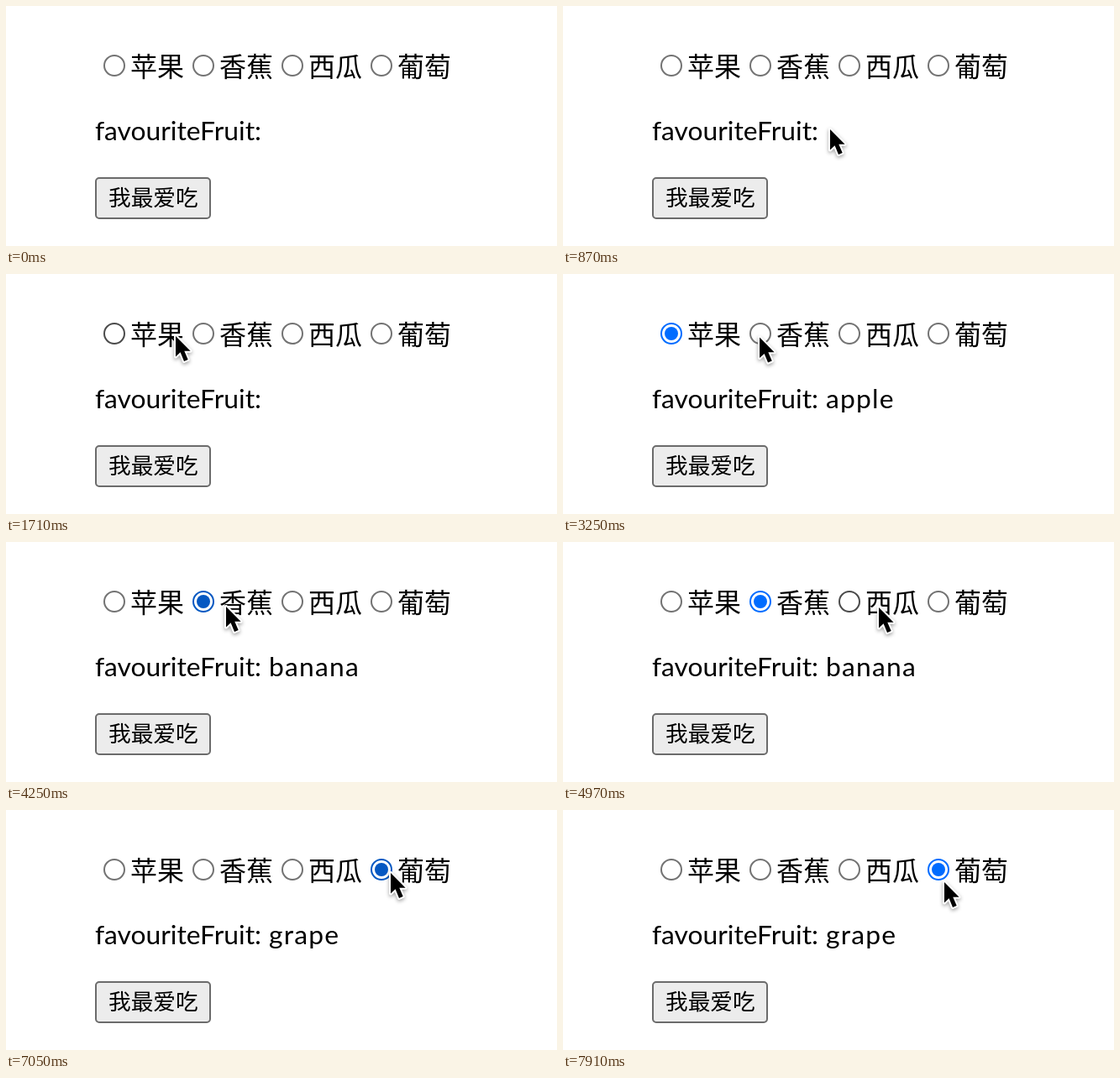
Write an HTML page that moves like this. It is 656 by 286 pixels and loops after 8 s.

```html
<!DOCTYPE html>
<html lang="zh">
<head>
<meta charset="utf-8">
<title>Radio group</title>
<style>
  html, body { margin: 0; width: 100%; height: 100%; overflow: hidden; background: #fff; }
  svg { display: block; width: 100vw; height: 100vh; }
  text { fill: #000; white-space: pre; }
  .cjk { font: 32px "Noto Sans CJK SC", "Noto Sans CJK", sans-serif; }
  .btn { font-size: 26.67px; }
  .latin { font: 31.8px Lato, "Open Sans", sans-serif; }
  #value { letter-spacing: 1.2px; }
  #cursor { filter: drop-shadow(0 2px 2px rgba(0, 0, 0, .35)); }
</style>
</head>
<body>
<svg viewBox="0 0 656 286" xmlns="http://www.w3.org/2000/svg">
  <rect width="656" height="286" fill="#fff"/>
  <g id="options"></g>
  <text class="latin" x="106" y="160">favouriteFruit:</text>
  <text class="latin" id="value" x="313" y="160"></text>
  <rect x="107" y="205" width="136" height="48" rx="4" fill="#ececec" stroke="#6b6b6b" stroke-width="2"/>
  <text class="cjk btn" x="122" y="238">我最爱吃</text>
  <path id="cursor" d="M0 0V24.5L5.6 19.3L10 30L14.7 28L10.3 17.7H17.6Z"
        stroke="#fff" stroke-width="4" stroke-linejoin="round" paint-order="stroke"/>
</svg>
<script>
const LOOP = 8000, PITCH = 106, HOVER_LAG = 100, ENTER = 20;
const fruits = [["苹果", "apple"], ["香蕉", "banana"], ["西瓜", "watermelon"], ["葡萄", "grape"]];

const clicks = [
  { option: 0, down: 2170, up: 2550 },
  { option: 1, down: 3990, up: 4250 },
  { option: 3, down: 6610, up: 7050 }
];

// Pointer strokes; "via" bends a stroke into an arc
const entry = [541, 272];
const moves = [
  { start: ENTER, end: 770, to: [318, 147], via: [430, -30] },
  { start: 870, end: 1610, to: [202, 74], via: [270, 80] },
  { start: 3000, end: 3480, to: [262, 77] },
  { start: 4410, end: 4970, to: [376, 78] },
  { start: 5070, end: 5230, to: [438, 78] },
  { start: 5370, end: 5810, to: [458, 75], via: [446, 63] },
  { start: 7490, end: 7800, to: [454, 86] }
];

const smooth = u => u * u * (3 - 2 * u);

function pointer(t) {
  if (t < ENTER) return null;
  let pos = entry;
  for (const { start, end, to, via } of moves) {
    if (t < start) break;
    const from = pos, u = smooth(Math.min(1, (t - start) / (end - start))), v = 1 - u;
    pos = to.map((goal, k) => {
      const bend = via ? via[k] : (from[k] + goal) / 2;
      return v * v * from[k] + 2 * u * v * bend + u * u * goal;
    });
  }
  return pos;
}

function hovered(t) {
  const p = pointer(t - HOVER_LAG);
  if (!p) return -1;
  const [x, y] = p;
  return fruits.findIndex((_, i) => {
    const dx = x - 116 - i * PITCH;
    const onRadio = dx >= 0 && dx <= 26 && y >= 58 && y <= 84;
    const onText = dx >= 32 && dx <= 96 && y >= 50 && y <= 95;
    return onRadio || onText;
  });
}

function add(parent, tag, attrs, text = "") {
  const el = document.createElementNS("http://www.w3.org/2000/svg", tag);
  for (const key in attrs) el.setAttribute(key, attrs[key]);
  el.textContent = text;
  return parent.appendChild(el);
}

const byId = id => document.getElementById(id);
const value = byId("value"), cursor = byId("cursor");

const radios = fruits.map(([name], i) => {
  const g = add(byId("options"), "g", { transform: `translate(${i * PITCH} 0)` });
  add(g, "text", { class: "cjk", x: 148, y: 84 }, name);
  return {
    ring: add(g, "circle", { cx: 129, cy: 71, r: 12, fill: "#fff", "stroke-width": 2 }),
    dot: add(g, "circle", { cx: 129, cy: 71, r: 8 })
  };
});

function radioColor(checked, hover, pressed) {
  if (checked) return hover ? "#0558c2" : "#006cff";
  if (pressed) return "#858585";
  return hover ? "#4b4b4b" : "#737373";
}

function draw(t) {
  const done = clicks.filter(c => t >= c.up).pop();
  const held = clicks.find(c => t >= c.down && t < c.up);
  const over = hovered(t);

  radios.forEach(({ ring, dot }, i) => {
    const checked = !!done && done.option === i;
    const color = radioColor(checked, over === i, !!held && held.option === i);
    ring.setAttribute("stroke", color);
    dot.setAttribute("fill", checked ? color : "none");
  });

  value.textContent = done ? fruits[done.option][1] : "";

  const p = pointer(t);
  cursor.setAttribute("visibility", p ? "visible" : "hidden");
  if (p) cursor.setAttribute("transform", `translate(${p[0].toFixed(2)} ${p[1].toFixed(2)})`);
}

const start = performance.now();
function tick() {
  draw((performance.now() - start) % LOOP);
  requestAnimationFrame(tick);
}
tick();
</script>
</body>
</html>
```
